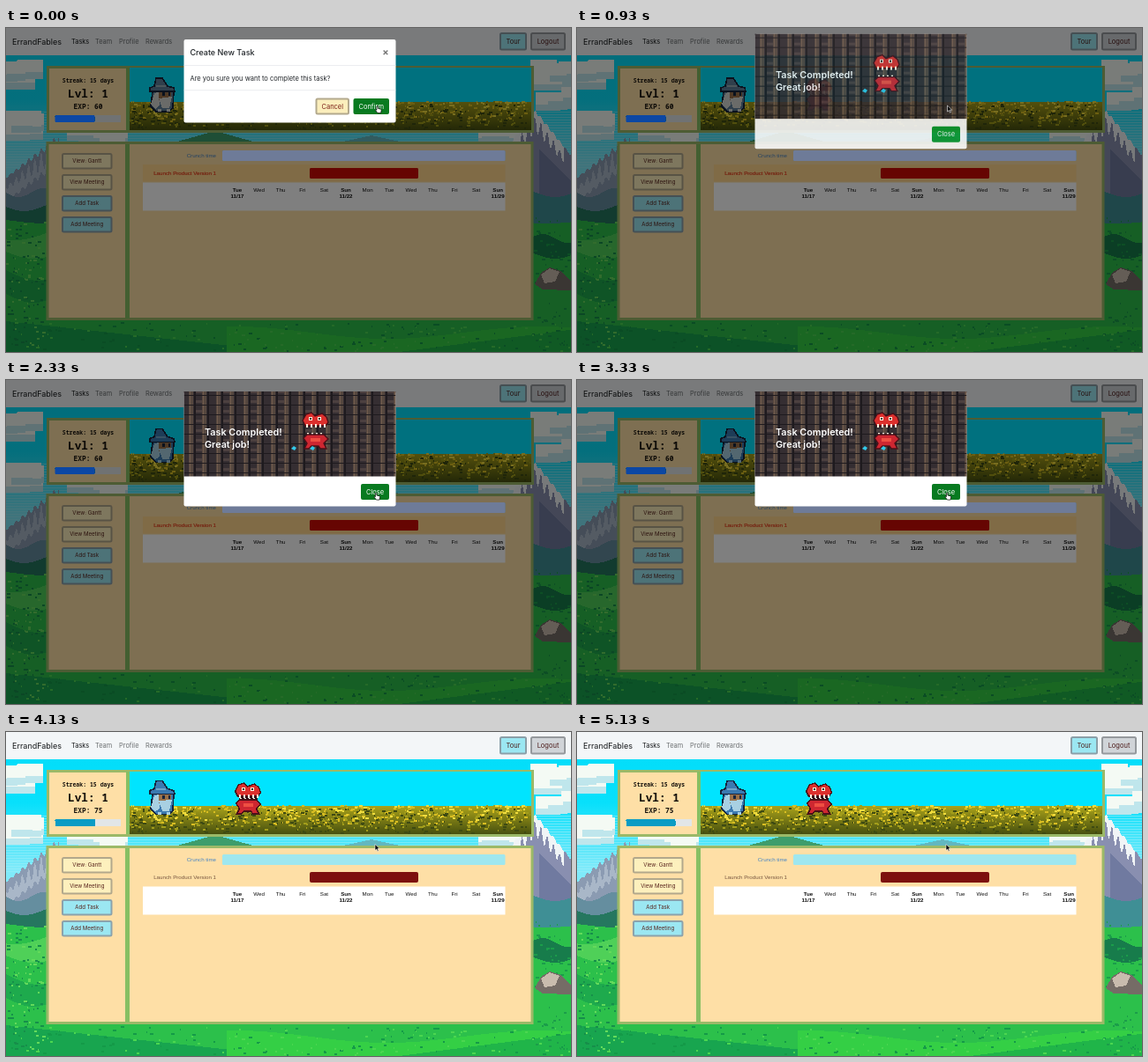
An HTML page that plays this animation: 640x368 px, repeating every 5.19 s.

```html
<!DOCTYPE html>
<html lang="en">
<head>
<meta charset="utf-8">
<title>Task dashboard</title>
<style>
html, body { margin: 0; width: 100%; height: 100%; overflow: hidden; background: #00dffb; }
svg { display: block; width: 640px; height: 368px; font-family: Inter, "Liberation Sans", sans-serif; }
.mono { font-family: "Noto Sans Mono", "DejaVu Sans Mono", monospace; font-weight: 600; }
.chart { font-family: "Liberation Sans", Arial, sans-serif; }
.pixel { shape-rendering: crispEdges; }
</style>
</head>
<body>
<svg id="stage" viewBox="0 0 640 368"></svg>
<script>
const LOOP = 5190;
const CONFIRM_OUT = 722, REWARD_IN = 800, REWARD_OUT = 3400, EXP_UP = 4060;
const stage = document.getElementById('stage');

const rect = (x, y, w, h, fill, more = '') =>
  `<rect x="${x}" y="${y}" width="${w}" height="${h}" fill="${fill}" ${more}/>`;
const text = (x, y, size, fill, label, more = '') =>
  `<text x="${x}" y="${y}" font-size="${size}" fill="${fill}" ${more}>${label}</text>`;
const poly = (points, fill, more = '') => `<polygon points="${points}" fill="${fill}" ${more}/>`;
const repeat = (count, draw) => Array.from({ length: count }, (_, i) => draw(i)).join('');
const middle = 'text-anchor="middle"';
const end = 'text-anchor="end"';

function randomizer(seed) {
  return () => (seed = (seed * 16807) % 2147483647) / 2147483647;
}

function button(x, y, w, h, fill, border, ink, label, size) {
  return rect(x, y, w, h, fill, `rx="1.5" stroke="${border}" stroke-width="2"`) +
    text(x + w / 2, y + h / 2 + size * .36, size, ink, label, middle);
}

// Scatters small dashes; a bias above 1 crowds them towards the top.
function speckle(seed, count, x, y, w, h, fill, bias = 1) {
  const rnd = randomizer(seed);
  const dash = () => {
    const length = 1 + Math.floor(rnd() * 4);
    return `M${Math.round(x + rnd() * (w - length))} ${Math.round(y + rnd() ** bias * (h - 2))}h${length}v2h${-length}z`;
  };
  return `<path fill="${fill}" d="${repeat(count, dash)}"/>`;
}

// Fills the area between two curves of x.
function ridge(from, to, top, fill, bottom = () => 368) {
  let upper = '', lower = '';
  for (let x = from; x <= to; x += 2) {
    upper += `${x},${top(x)} `;
    lower = `${x},${bottom(x)} ` + lower;
  }
  return poly(upper + lower, fill);
}

function cloud(seed, x, y, w, h) {
  const rnd = randomizer(seed);
  return repeat(9, i => {
    const puff = w * (.3 + rnd() * .3);
    const left = Math.round(x + rnd() * (w - puff)), top = Math.round(y + rnd() * h * .5);
    return rect(left, top + 4, Math.round(puff), Math.round(h * .5), '#bfe6ec') +
      rect(left, top, Math.round(puff), Math.round(h * .4), '#f4faf4');
  });
}

function scenery() {
  const jag = x => 3 * Math.sin(x * .9) + 2 * Math.sin(x * 2.3);
  const leftPeak = x => 170 - .75 * x + jag(x);
  const rightPeak = x => 95 + 1.25 * Math.abs(x - 600) + jag(x) * .5;
  const wave = (y, height, length, shift = 0) => x => y + height * Math.sin((x + shift) / length);
  const hill = (center, top, slope) => x => top + slope * Math.abs(x - center);
  return rect(0, 0, 640, 368, 'url(#sky)') +
    repeat(22, i => rect(0, 95 + i * 3, 640, 1, '#9beffa', 'opacity=".55"')) +
    cloud(12, -12, 36, 60, 36) + cloud(37, -12, 92, 60, 32) +
    cloud(58, 594, 34, 58, 34) + cloud(91, 598, 64, 50, 26) + cloud(23, 534, 116, 70, 16) + cloud(44, 60, 116, 80, 16) +
    ridge(190, 286, hill(237, 117, .28), '#3d9d6c') + ridge(376, 452, hill(414, 122, .22), '#62b7c0') +
    ridge(0, 60, leftPeak, '#8b9bb2') + ridge(0, 60, x => leftPeak(x) + 12 + 2 * jag(x), '#a9b7c8', x => leftPeak(x) + 27) +
    ridge(0, 60, wave(187, 5, 9), '#658e9f') +
    ridge(550, 640, rightPeak, '#898fb0') + ridge(570, 632, rightPeak, '#f0f4f6', x => rightPeak(x) + 14 + 2 * jag(x)) +
    ridge(604, 640, x => 138 + (x - 604), '#707aa0') + ridge(590, 640, wave(188, 4, 12), '#3f8f95') +
    ridge(0, 60, wave(203, 5, 13), '#25775f') + ridge(0, 640, wave(218, 4, 30), '#2cc04b') +
    ridge(0, 60, wave(232, 9, 25, 30), '#4fd058', wave(254, 8, 20)) +
    ridge(0, 60, wave(275, 12, 24), '#1eaa4d', wave(302, 10, 20)) +
    ridge(590, 640, wave(239, 5, 9), '#177c4b', wave(258, 4, 12)) +
    ridge(0, 320, x => 333 + x * .11, '#18a54f') + ridge(250, 640, wave(346, 7, 55), '#34cf45') +
    ridge(430, 640, x => 370 - (x - 430) * .13, '#20b549') +
    speckle(5, 70, 0, 222, 46, 146, '#168f4a') + speckle(9, 50, 0, 218, 46, 148, '#64da5b') +
    speckle(15, 60, 598, 212, 42, 156, '#1b9d4a') +
    speckle(21, 100, 0, 334, 640, 34, '#149a48') + speckle(27, 80, 0, 334, 640, 34, '#4bd650') +
    poly('599,291 606,278 616,272 628,276 640,287 640,298 608,297', '#756c66') +
    poly('606,280 616,273 627,277 622,288 610,290', '#c9bcae');
}

const field = () => rect(140, 84, 455, 32, 'url(#grass)') +
  speckle(71, 330, 140, 83, 455, 24, '#d8bd22', 1.2) + speckle(77, 300, 140, 86, 455, 30, '#3e4a12') +
  speckle(83, 260, 140, 83, 455, 30, '#a29d1b') + speckle(88, 130, 140, 83, 455, 18, '#f0dc3e', 1.5);

function wizard(id, y, blue, pale) {
  const outline = 'stroke="#17243c" stroke-width="1.6"';
  return `<g id="${id}" transform="translate(162 ${y})">` +
    poly('4,16 28,16 27,35 22,39 8,39 2,33', blue, outline) +
    poly('6,18 12,16 12,32 7,36 2,31', pale) +
    rect(11, 15, 14, 11, '#9b7149') + poly('11,24 26,22 23,35 15,35', pale) +
    rect(15, 17, 3, 4, '#17243c') + rect(22, 17, 2, 4, '#17243c') +
    poly('8,1 15,1 21,10 28,12 29,16 1,16 1,12 6,10', blue, outline) +
    rect(8, 9, 11, 2, pale, 'opacity=".5"') + rect(10, 36, 4, 3, pale) + rect(20, 36, 4, 3, pale) + '</g>';
}

function beast(x, y, gap) {
  const outline = 'stroke="#4a1018" stroke-width="1.4"';
  return `<g transform="translate(${x} ${y})">` + (gap ? '' : rect(4, 14, 21, 6, '#2a1016')) +
    poly('0,9 4,2 10,0 14,4 22,1 27,5 29,11 26,15 3,15', '#dc302d', outline) +
    repeat(2, i => rect(7 + 10 * i, 5, 4, 4, '#fff3df') + rect(8 + 10 * i, 6, 2, 2, '#191016')) +
    repeat(5, i => rect(4 + 5 * i, 13, 2, 4, '#fff3df')) +
    `<g transform="translate(0 ${18 + gap})">` + repeat(4, i => rect(5 + 5 * i, -1, 2, 3, '#fff3df')) +
    poly('1,5 5,1 24,1 29,6 24,11 27,17 20,17 18,14 10,14 7,17 2,17 5,11', '#ce2731', outline) +
    rect(9, 5, 11, 4, '#ef4f42') + '</g></g>';
}

function heroPanel() {
  const label = (y, size, words, more = '') => text(93, y, size, '#16120c', words, `${middle} class="mono" ${more}`);
  return rect(47, 44, 549, 73, '#fedfa6', 'stroke="#9bb968" stroke-width="3"') +
    rect(140, 45, 455, 40, '#00e4ff') + field() + rect(136, 45, 4, 71, '#87bf63') +
    label(62, 6.5, 'Streak: 15 days') + label(79, 12.8, 'Lvl: 1') + label(91.5, 7.9, 'EXP: 60', 'id="exp"') +
    rect(55.5, 99, 74.5, 8, '#e2e6e7', 'rx="1.5"') + rect(55.5, 99, 45, 8, '#0b9cc4', 'rx="1.5" id="fill"') +
    wizard('cast', 56, '#5e7f99', '#d6d8d4') + wizard('idle', 54.5, '#3b79b0', '#a8d0e2') + beast(259.5, 58, 0);
}

function workPanel() {
  const labels = ['View: Gantt', 'View Meeting', 'Add Task', 'Add Meeting'];
  return rect(47, 130.5, 549, 200, '#fedfa6', 'stroke="#9bb968" stroke-width="3"') +
    rect(135, 132, 5, 198, '#87bf63') +
    labels.map((label, i) => button(64, 143 + 24 * i, 55.5, 16.5, i < 2 ? '#fdf0bd' : '#9be7f2',
      i < 2 ? '#b2a88c' : '#8ba2ac', '#57221b', label, 6.1)).join('');
}

const crunchBar = fill => rect(245, 139, 320.5, 12, fill, 'rx="1.5"');
const launchBar = fill => rect(344, 159, 123, 12, fill, 'rx="2"');
const launchLabel = fill => text(238, 167, 6.2, fill, 'Launch Product Version 1', end + ' class="chart"');

function gantt() {
  const days = ['Sun', 'Mon', 'Tue', 'Wed', 'Thu', 'Fri', 'Sat'];
  const axis = repeat(13, i => {
    const x = 262 + 24.6 * i, day = days[(i + 2) % 7];
    const bold = i === 0 || day === 'Sun';
    const style = middle + (bold ? ' font-weight="700"' : '');
    return text(x, 185.5, 6.2, '#111', day, style) + (bold ? text(x, 192.5, 6.2, '#111', `11/${17 + i}`, style) : '');
  });
  return '<g class="chart">' + text(238, 147, 6.2, '#4584c4', 'Crunch time', end) + crunchBar('#9fe7ef') +
    launchLabel('#765640') + launchBar('#7d100f') + rect(155, 175.5, 410.5, 32, '#fff') +
    `<g clip-path="url(#axisClip)">${axis}</g></g>`;
}

function navbar() {
  const links = { Tasks: 74, Team: 101, Profile: 128, Rewards: 158 };
  return rect(0, 0, 640, 31, '#f3f6f8') + text(7, 18.5, 9, '#17191b', 'ErrandFables') +
    Object.entries(links).map(([label, x]) =>
      text(x, 18, 7.4, label === 'Tasks' ? '#17191b' : '#6d7072', label)).join('') +
    button(560, 6, 29, 18.5, '#9be7f2', '#8b9fa8', '#4d211c', 'Tour', 7.5) +
    button(595, 6, 38, 18.5, '#d0d4d8', '#95999d', '#4d1d1c', 'Logout', 7.5);
}

function shade() {
  return rect(0, 0, 640, 368, '#000', 'opacity=".5"') + rect(155, 155, 410.5, 19.5, '#8a5000', 'opacity=".15"') +
    crunchBar('#6e7b98') + launchBar('#660502') + launchLabel('#8e2412') + rect(55.5, 99, 45, 8, '#0c47a4', 'rx="1.5"');
}

function confirmModal() {
  return rect(201.5, 13, 240, 94.5, '#fff', 'rx="2"') +
    text(208.5, 31, 9, '#212529', 'Create New Task', 'font-weight="500"') +
    text(430, 30.5, 11, '#777', '×', middle + ' font-weight="700"') +
    rect(201.5, 42, 240, .6, '#dee2e6') + rect(201.5, 70.5, 240, .6, '#dee2e6') +
    text(208.5, 59.5, 7.5, '#212529', 'Are you sure you want to complete this task?') +
    button(351.5, 80.5, 36.5, 17, '#fbeebc', '#b3a98d', '#7c2018', 'Cancel', 7.5) +
    rect(393.5, 80, 40.5, 18, '#087a20', 'rx="2"') + text(413.7, 91.8, 7.5, '#fff', 'Confirm', middle);
}

function rewardModal() {
  const heading = (y, words) => text(225, y, 10.8, '#fff', words, 'font-weight="600"');
  return rect(201.5, 13, 240, 130.5, '#fff', 'rx="2"') + rect(201.5, 13, 240, 96.5, 'url(#wall)') +
    heading(63, 'Task Completed!') + heading(77, 'Great job!') + beast(336, 37, 6) +
    repeat(2, i => poly(`${323 + 21 * i},78 ${326 + 21 * i},75 ${329 + 21 * i},77 ${327 + 21 * i},80`, '#32c9ea')) +
    rect(402, 118, 32, 18, '#0b9c31', 'rx="2" id="close"') + text(418, 129.8, 7.5, '#fff', 'Close', middle);
}

function wallTile() {
  return rect(0, 0, 31, 22, '#352e32') +
    repeat(2, i => rect(3 + 15 * i, 0, 5, 22, '#55473f') + rect(4 + 15 * i, 0, 1, 22, '#705b4d') +
      rect(9 + 15 * i, 0, 2, 22, '#1e1a1e')) +
    repeat(2, i => rect(11, 3 + 11 * i, 7, 3, '#4c4040') + rect(0, 8 + 11 * i, 31, 1, '#1e1a1e'));
}

stage.innerHTML = `<defs>
  <linearGradient id="sky" x2="0" y2="1"><stop stop-color="#00dcf9"/><stop offset=".22" stop-color="#08e0fb"/>
    <stop offset=".42" stop-color="#7feafa"/></linearGradient>
  <linearGradient id="grass" x2="0" y2="1"><stop stop-color="#aaa21a"/><stop offset="1" stop-color="#47500f"/></linearGradient>
  <clipPath id="axisClip"><rect x="155" y="175" width="410.5" height="33"/></clipPath>
  <pattern id="wall" x="204" y="9" width="31" height="22" patternUnits="userSpaceOnUse">${wallTile()}</pattern></defs>
  <g class="pixel">${scenery()}</g>${navbar()}
  <g class="pixel">${heroPanel()}</g>${workPanel()}${gantt()}
  <g id="shade">${shade()}</g>
  <g id="confirm">${confirmModal()}</g><g id="reward">${rewardModal()}</g>
  <g id="cursor"><path id="arrow" d="M0 0v7l1.7-1.5 1.2 2.6 1.2-.6-1.2-2.4h2.3z" fill="#000" stroke="#fff" stroke-width=".6"/>
    <path id="hand" d="M.4 1q.8-1 1.5 0v2.4l3.2.8q.8.3.6 1.2l-.6 3.2h-3.6l-2.6-3.2q.2-1 1.5-.2z" fill="#fff" stroke="#000" stroke-width=".7"/></g>`;

const part = id => document.getElementById(id);
const span = (t, from, length) => Math.max(0, Math.min(1, (t - from) / length));
const easeOut = p => 1 - (1 - p) ** 2;
const easeInOut = p => p * p * (3 - 2 * p);
const show = (id, visible) => part(id).setAttribute('display', visible ? 'inline' : 'none');

function placeModal(id, opacity, slide) {
  part(id).setAttribute('opacity', opacity);
  part(id).setAttribute('transform', `translate(0 ${-24 * slide})`);
}

function render(t) {
  const leaving = span(t, REWARD_OUT, 150);
  placeModal('confirm', 1 - span(t, CONFIRM_OUT, 150), easeOut(span(t, CONFIRM_OUT, 300)));
  placeModal('reward', span(t, REWARD_IN, 150) - leaving,
    1 - easeOut(span(t, REWARD_IN, 270)) + easeOut(span(t, REWARD_OUT, 300)));
  part('shade').setAttribute('opacity', 1 - leaving);

  show('cast', t < 1000);
  show('idle', t >= 1000);
  part('exp').textContent = t < EXP_UP ? 'EXP: 60' : 'EXP: 75';
  part('fill').setAttribute('width', 45 + 11 * easeInOut(span(t, EXP_UP, 560)));

  const move = easeInOut(span(t, 1670, 460));
  const y = 88 + 39.5 * move;
  const overClose = y > 118 && leaving < 1;
  const hand = t < 860 || overClose;
  show('hand', hand);
  show('arrow', !hand);
  part('close').setAttribute('fill', overClose ? '#087a20' : '#0b9c31');
  part('cursor').setAttribute('transform', `translate(${419.5 - 1.5 * move} ${y})`);
}

const start = performance.now();
function tick(now) {
  render(Math.max(0, now - start) % LOOP);
  requestAnimationFrame(tick);
}
render(0);
requestAnimationFrame(tick);
</script>
</body>
</html>
```
